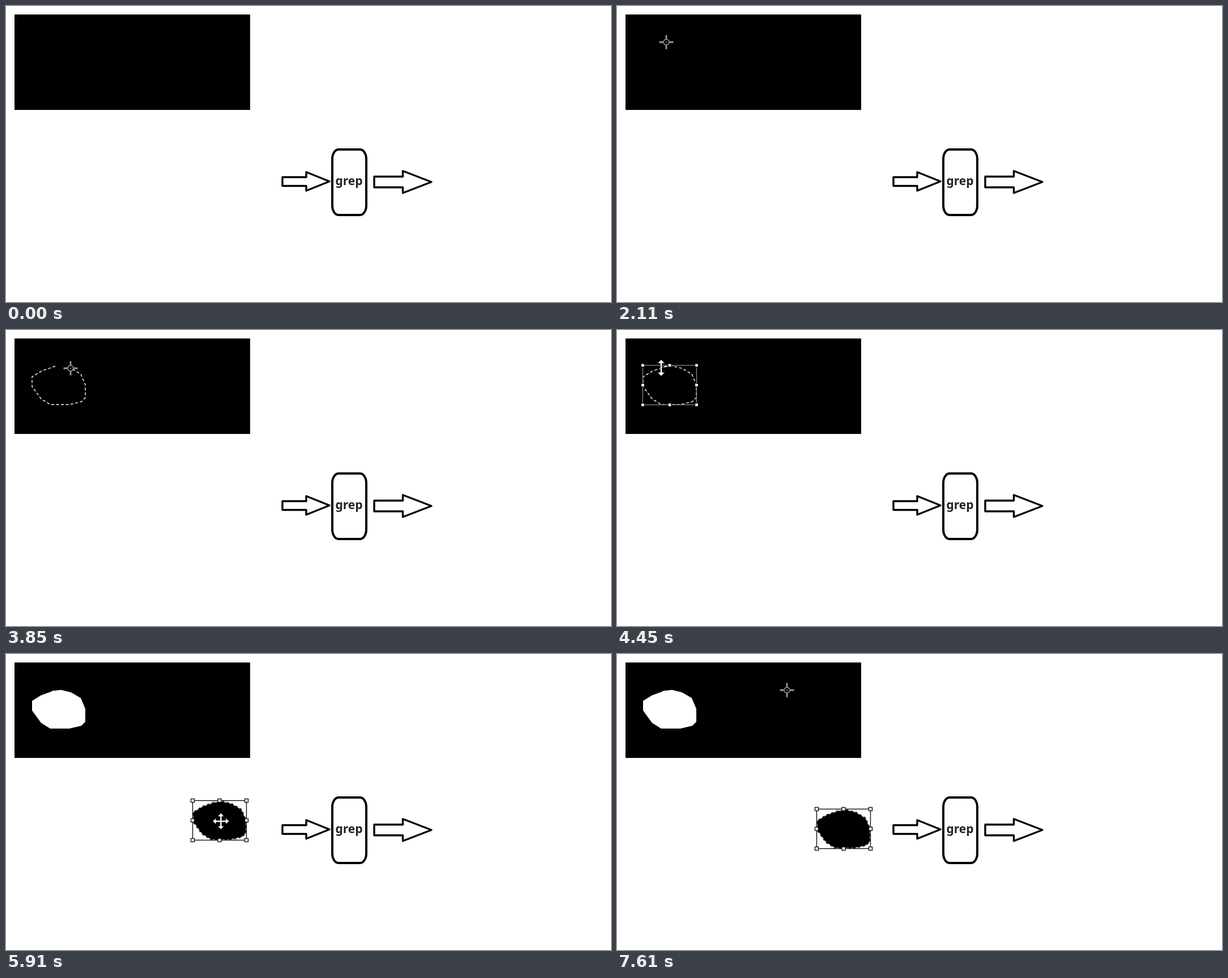
These frames come from a looping animation (1068 by 524 pixels, 8000 ms). An HTML page:

```html
<!DOCTYPE html>
<html lang="en">
<head>
<meta charset="utf-8">
<title>grep filter</title>
<style>
  html, body { margin: 0; width: 100%; height: 100%; overflow: hidden; background: #fff; }
  svg { display: block; width: 100vw; height: 100vh; }
  .pipe { fill: #fff; stroke: #000; stroke-width: 3.4; stroke-linejoin: round; }
  .base, .dash { fill: none; stroke-width: 1.4; stroke-linejoin: round; }
  .base { stroke: #000; }
  .dash { stroke: #fff; stroke-dasharray: 5 3.5; }
  .pointer { fill: #fff; stroke: #222; stroke-width: .9; }
  .handle { fill: #fff; stroke: #000; stroke-width: 1.3; }
  text { font: 700 21px "Noto Sans", "Open Sans", sans-serif; fill: #222; text-anchor: middle; }
</style>
</head>
<body>
<svg viewBox="0 0 1068 524">
  <defs>
    <clipPath id="dark"><rect x="15" y="15" width="416" height="169"/></clipPath>
  </defs>
  <rect x="15" y="15" width="416" height="169"/>
  <polygon id="hole" class="outline" fill="#fff"/>

  <polygon class="pipe" points="488,303 530,303 530,294 571,310.5 530,327 530,318.5 488,318.5"/>
  <rect class="pipe" x="576" y="254" width="60" height="116" rx="11" ry="17" style="stroke-width:4"/>
  <polygon class="pipe" points="650,302 700.5,302 700.5,292 751,311.5 700.5,331 700.5,321 650,321"/>
  <text x="605.5" y="317">grep</text>

  <polyline id="trail" class="dash"/>
  <g id="piece">
    <polygon class="outline"/>
    <polygon class="outline base"/>
    <polygon class="outline dash"/>
  </g>
  <rect class="box" width="95" height="70" fill="none" stroke="#000" stroke-width="1.3"/>
  <g clip-path="url(#dark)">
    <rect class="box" width="95" height="70" fill="none" stroke="#999" stroke-width="1.1"/>
  </g>
  <g id="handles" class="box"></g>

  <g id="cross" fill="none" stroke="#999">
    <path stroke-width="2.8" d="M-12.5 0H-5.5M5.5 0H12.5M0 -12.5V-5.5M0 5.5V12.5"/>
    <circle r="5" stroke="#aaa" stroke-width="1.3"/>
    <circle r="1" fill="#aaa" stroke="none"/>
  </g>
  <path id="resize" class="pointer" d="M0-14.5L6.5-8H1.6V8H6.5L0 14.5L-6.5 8H-1.6V-8H-6.5Z"/>
  <path id="move" class="pointer" d="M0-14.5L5.5-8.5H1.6V-1.6H8.5V-5.5L14.5 0L8.5 5.5V1.6H1.6V8.5H5.5L0 14.5L-5.5 8.5H-1.6V1.6H-8.5V5.5L-14.5 0L-8.5-5.5V-1.6H-1.6V-8.5H-5.5Z"/>
</svg>
<script>
const LOOP = 8000, STEP = 50;
const DRAW = 2280, SELECT = 4400, DRAG = 5580, LEAVE = 7040;
const $ = q => document.querySelector(q);
const all = q => [...document.querySelectorAll(q)];

const lasso = [[87, 64], [62, 73], [46, 83], [46, 100], [62, 122], [78, 132], [97, 132], [112, 132],
  [133, 127], [140, 120], [140, 97], [132, 78], [115, 68], [97, 63.5], [78, 66]];

const span = (t, a, b) => Math.min(1, Math.max(0, (t - a) / (b - a)));
const smooth = k => k * k * (3 - 2 * k);
const easeOut = (k, n) => 1 - (1 - k) ** n;
const mix = ([ax, ay], [bx, by], k) => [ax + (bx - ax) * k, ay + (by - ay) * k];

// The lasso is drawn at an even pace, one corner after another.
const progress = t => Math.min(lasso.length - 1, (t - DRAW) * 7 / 900);

function pointOn(u) {
  const i = Math.min(Math.floor(u), lasso.length - 2);
  return mix(lasso[i], lasso[i + 1], u - i);
}

// A fast pull that slows down, then a small nudge.
function shift(t) {
  const k = span(t, 5545, 6300), nudge = 4 * span(t, 6390, 6530);
  return [303 * easeOut(k, 4.7) + nudge, 208 * easeOut(k, 5) + nudge];
}

function pointer(t) {
  if (t < 230) return ["none", [0, 0]];
  if (t < DRAW) return ["cross", mix([316, 369], [87, 64], smooth(span(t, 230, 760)))];
  if (t < SELECT) return ["cross", pointOn(progress(t))];
  if (t < DRAG) {
    const p = mix([78, 67], [87, 94], smooth(span(t, 4780, 5100)));
    return [p[1] < 72 ? "resize" : "move", p];
  }
  if (t < LEAVE) {
    const [x, y] = shift(t + STEP); // the hand leads the piece by one step
    return ["move", [87 + x, 94 + y]];
  }
  const p = mix([394, 306], [300, 64], smooth(span(t, LEAVE, 7580)));
  return [p[1] > 274 ? "move" : "cross", p];
}

const place = (el, x, y) => el.setAttribute("transform", `translate(${x.toFixed(2)} ${y.toFixed(2)})`);
const show = (el, on) => { el.style.display = on ? "" : "none"; };

for (const el of all(".outline")) el.setAttribute("points", lasso.join(" "));

for (let i = 0; i < 9; i++) {
  if (i === 4) continue;
  const x = i % 3 * 47.5 - 3, y = Math.floor(i / 3) * 35 - 3;
  $("#handles").innerHTML += `<rect class="handle" x="${x}" y="${y}" width="6" height="6"/>`;
}

const trail = $("#trail"), piece = $("#piece"), hole = $("#hole"), boxes = all(".box");
const cursors = ["cross", "resize", "move"].map(id => $("#" + id));

function render(t) {
  const drawing = t >= DRAW && t < SELECT, selected = t >= SELECT;
  show(trail, drawing);
  show(piece, selected);
  show(hole, t >= DRAG);

  if (drawing) {
    const u = progress(t);
    trail.setAttribute("points", [...lasso.slice(0, Math.floor(u) + 1), pointOn(u)].join(" "));
  }

  const [dx, dy] = t < DRAG ? [0, 0] : shift(t).map(Math.round);
  place(piece, dx, dy);
  for (const b of boxes) {
    show(b, selected);
    place(b, 45.5 + dx, 62.5 + dy);
  }

  const [kind, [x, y]] = pointer(t);
  for (const el of cursors) {
    show(el, el.id === kind);
    place(el, x, y);
  }
}

const stepped = t => Math.floor((t - 30) / STEP) * STEP + 30;

const start = performance.now();
function tick(now) {
  render(stepped(Math.max(0, now - start) % LOOP));
  requestAnimationFrame(tick);
}
render(0);
requestAnimationFrame(tick);
</script>
</body>
</html>
```
